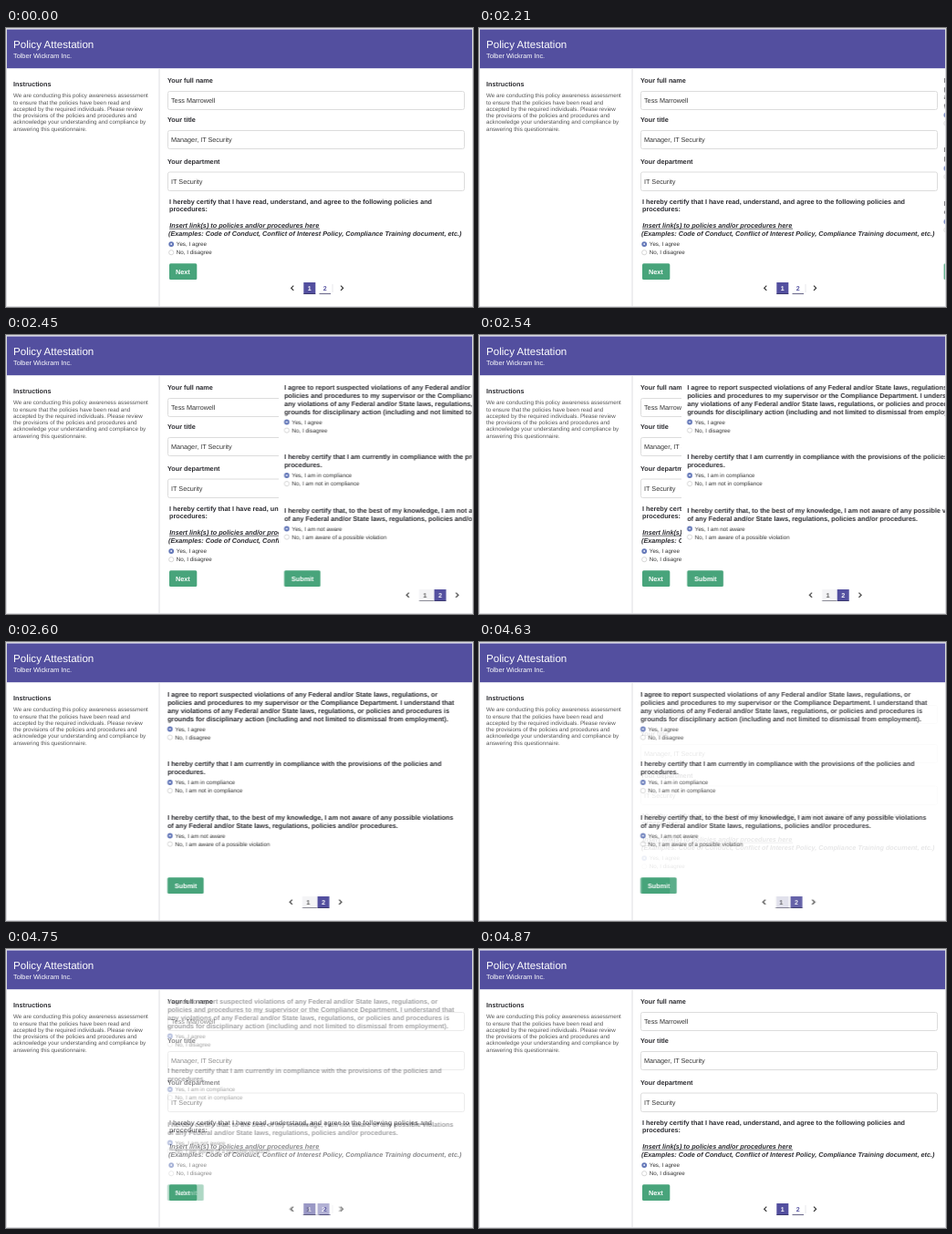
These frames come from a looping animation (512x306 px, 4900 ms). An HTML page:

```html
<!DOCTYPE html>
<html lang="en">
<head>
<meta charset="utf-8">
<title>Policy Attestation</title>
<style>
  html, body { margin: 0; width: 100%; height: 100%; overflow: hidden; background: #fff; }
  svg { display: block; width: 100vw; height: 100vh; }
  text {
    font-family: "Liberation Sans", Arial, sans-serif;
    text-rendering: geometricPrecision;
    white-space: pre;
  }
  .title { font-size: 11.6px; fill: #fff; }
  .company { font-size: 7.3px; fill: #fff; }
  .body { font-size: 6.24px; fill: #555; }
  .label { font-size: 7.26px; font-weight: bold; fill: #2c2c31; }
  .em { font-style: italic; }
  .value { font-size: 7.24px; fill: #333; }
  .option { font-size: 6.26px; fill: #333; }
  .button { font-size: 7.25px; font-weight: bold; fill: #fff; }
  .num { font-size: 7px; font-weight: bold; text-anchor: middle; }
</style>
</head>
<body>
<svg id="stage" viewBox="0 0 512 306"></svg>
<script>
const LOOP = 4900;
const PURPLE = '#534f9f';
const GREEN = '#48a47b';

const text = (cls, x, y, s) => `<text class="${cls}" x="${x}" y="${y}">${s}</text>`;
const lines = (cls, x, y, step, list) =>
  list.map((s, i) => text(cls, x, y + i * step, s)).join('');
const rect = (x, y, w, h, fill, more = '') =>
  `<rect x="${x}" y="${y}" width="${w}" height="${h}" fill="${fill}" ${more}/>`;
const path = (d, stroke, width) =>
  `<path d="${d}" fill="none" stroke="${stroke}" stroke-width="${width}"/>`;

const field = (label, labelY, top, height, value) =>
  text('label', 177, labelY, label) +
  rect(177.5, top, 325, height, '#fff', 'rx="2" stroke="#dcdcdc"') +
  text('value', 181, top + height / 2 + 2.5, value);

const radio = (x, y, on) => on
  ? `<circle cx="${x}" cy="${y}" r="2.9" fill="#6478b8"/><circle cx="${x}" cy="${y}" r="1" fill="#e8ecfa"/>`
  : `<circle cx="${x}" cy="${y}" r="2.6" fill="#fff" stroke="#c4c4c4" stroke-width=".7"/>`;

const choice = (x, y, yes, no) =>
  radio(x, y - 2.1, true) + text('option', x + 5.6, y, yes) +
  radio(x, y + 7, false) + text('option', x + 5.6, y + 9.1, no);

const button = (x, w, textX, s) =>
  rect(x, 258.3, w, 17.6, GREEN, 'rx="1.5"') + text('button', textX, 269.6, s);

const chevron = (x, dir) =>
  path(`M${x - dir * 1.3} 282.6l${dir * 2.6} 2.6l${-dir * 2.6} 2.6`, '#333', 1.2);

const frame =
  rect(0, 0, 512, 306, '#fff') +
  rect(1, 1.5, 510, 42.7, PURPLE) +
  text('title', 8, 22, 'Policy Attestation') +
  text('company', 8, 33.4, 'Tolber Wickram Inc.') +
  text('label', 8, 64.4, 'Instructions') +
  lines('body', 8, 76.4, 7.25, [
    'We are conducting this policy awareness assessment',
    'to ensure that the policies have been read and',
    'accepted by the required individuals. Please review',
    'the provisions of the policies and procedures and',
    'acknowledge your understanding and compliance by',
    'answering this questionnaire.'
  ]) +
  path('M168 44V306', '#dedee2', 1);

const pageOne =
  field('Your full name', 60.2, 69.5, 20, 'Tess Marrowell') +
  field('Your title', 103.3, 112.5, 20, 'Manager, IT Security') +
  field('Your department', 149.3, 158, 20.5, 'IT Security') +
  lines('label', 179, 192.8, 8.6, [
    'I hereby certify that I have read, understand, and agree to the following policies and',
    'procedures:'
  ]) +
  text('label em', 179.2, 218.6, 'Insert link(s) to policies and/or procedures here') +
  path('M179 220.2H344', '#2c2c31', .7) +
  text('label em', 178, 228,
    '(Examples: Code of Conduct, Conflict of Interest Policy, Compliance Training document, etc.)') +
  choice(181.2, 239.2, 'Yes, I agree', 'No, I disagree') +
  button(179, 30.3, 186, 'Next') +
  chevron(314, -1) +
  rect(326.3, 279, 13, 12.5, PURPLE) +
  path('M326.3 291.5h13', '#3d3a70', 1) +
  text('num', 332.8, 287.7, '1').replace('<text', '<text fill="#fff"') +
  text('num', 349.7, 287.7, '2').replace('<text', `<text fill="${PURPLE}"`) +
  path('M343.5 291.5h12.5', '#666487', 1) +
  path('M358 281V290', '#e2e2e6', .8) +
  chevron(368.3, 1);

const pageTwo =
  rect(171, 45, 341, 261, '#fff') +
  lines('label', 177, 60.4, 8.8, [
    'I agree to report suspected violations of any Federal and/or State laws, regulations, or',
    'policies and procedures to my supervisor or the Compliance Department. I understand that',
    'any violations of any Federal and/or State laws, regulations, or policies and procedures is',
    'grounds for disciplinary action (including and not limited to dismissal from employment).'
  ]) +
  choice(179.8, 97.6, 'Yes, I agree', 'No, I disagree') +
  lines('label', 177, 136.4, 8.8, [
    'I hereby certify that I am currently in compliance with the provisions of the policies and',
    'procedures.'
  ]) +
  choice(179.8, 156.1, 'Yes, I am in compliance', 'No, I am not in compliance') +
  lines('label', 177, 195.2, 8.8, [
    'I hereby certify that, to the best of my knowledge, I am not aware of any possible violations',
    'of any Federal and/or State laws, regulations, policies and/or procedures.'
  ]) +
  choice(179.8, 214.6, 'Yes, I am not aware', 'No, I am aware of a possible violation') +
  button(177, 39.7, 184.8, 'Submit') +
  chevron(312.5, -1) +
  rect(325, 279, 16, 12.5, '#f4f4f6') +
  path('M325 291.5h16', '#8a8a96', 1) +
  text('num', 331.3, 287.7, '1').replace('<text', '<text fill="#555"') +
  rect(341.5, 279, 13, 12.5, PURPLE) +
  path('M341.5 291.5h13', '#3d3a70', 1) +
  text('num', 348, 287.7, '2').replace('<text', '<text fill="#fff"') +
  chevron(366.5, 1);

const stage = document.getElementById('stage');
stage.innerHTML = frame +
  `<g>${pageOne}</g><g id="second">${pageTwo}</g>` +
  rect(.5, .5, 511, 305, 'none', 'stroke="#d9d9de"');

// Rows of [time, value, easing towards the next row].
const play = (el, prop, rows) => el.animate(
  rows.map(([time, value, easing = 'linear']) => ({ offset: time / LOOP, [prop]: value, easing })),
  { duration: LOOP, iterations: Infinity });

const second = document.getElementById('second');
const slide = play(second, 'transform', [
  [0, 'translateX(358.4px)'],
  [2210, 'translateX(358.4px)', 'steps(14, start)'],
  [2630, 'translateX(0px)'],
  [LOOP, 'translateX(0px)']
]);
const fade = play(second, 'opacity', [
  [0, 1],
  [4630, 1, 'steps(9, start)'],
  [LOOP, 0]
]);
slide.startTime = fade.startTime = document.timeline.currentTime;
</script>
</body>
</html>
```
